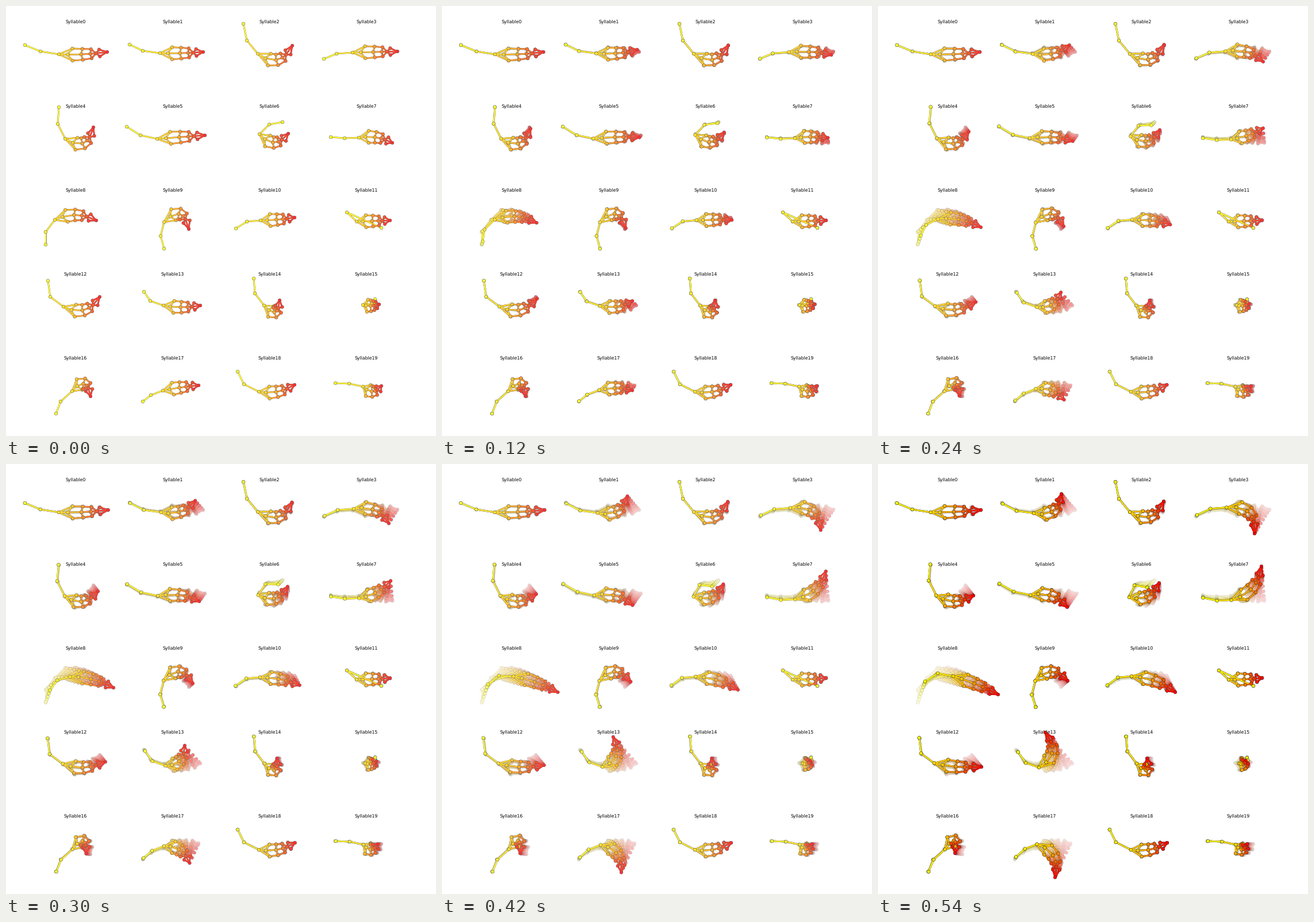
A matplotlib script for the animation above (0.6 s loop, 748 by 748 pixels).

```python
import numpy as np
import matplotlib.pyplot as plt
from matplotlib.animation import FuncAnimation
from matplotlib.collections import LineCollection

SIZE, DPI = 748, 100
STEPS, INTERVAL = 10, 60
RECOIL = -0.13  # how far the base swings against the nose

# The body hangs on a curve from tail base (0) to nose (1).
SPINE_AT = np.array([0, 0.18, 0.46, 0.65, 0.77, 1])
SIDE_AT = np.repeat([0.28, 0.49, 0.67, 0.84], 2)
HALF_WIDTH = np.repeat([10.5, 9.5, 8, 6], 2) * np.tile([1, -1], 4)

# Nodes: tip, tail, then the spine 2-7, then hips, waist, shoulders, ears.
EDGES = np.array([
    (0, 1), (1, 2), (2, 3), (2, 8), (2, 9), (3, 8), (3, 9), (3, 4),
    (8, 10), (9, 11), (4, 10), (4, 11), (4, 5), (10, 12), (11, 13),
    (5, 12), (5, 13), (5, 6), (12, 6), (13, 6), (6, 14), (6, 15),
    (14, 7), (15, 7), (6, 7)])
RANK = [0, 1, 2, 3, 8, 9, 4, 10, 11, 5, 12, 13, 6, 14, 15, 7]  # tail to nose
SHADE = 1 - np.argsort(RANK) / 15


def ease(u):
    return 0.8 * u * u * (3 - 2 * u) + 0.2 * u


def body(base, nose, bend):
    """Nodes along an arched line and in pairs on both sides of it."""
    chord = nose - base
    up = -1j * chord / abs(chord)

    def curve(t):
        return base + t * chord + 4 * t * (1 - t) * bend * up

    slope = chord + 4 * (1 - 2 * SIDE_AT) * bend * up
    sides = curve(SIDE_AT) - 1j * slope / abs(slope) * HALF_WIDTH
    return np.concatenate([curve(SPINE_AT), sides])


class Mouse:
    def __init__(self, tip, tail, base, nose, bend, nose_to, bend_to, walk=None):
        self.start = np.array([complex(*p) for p in (tip, tail, base, nose)])
        turn = complex(*nose_to) - self.start[3]
        if walk:
            shift = [complex(*p) for p in walk]
        else:
            shift = [0.6 * RECOIL * turn, RECOIL * turn, RECOIL * turn]
        self.shift = np.array([*shift, turn])
        self.bends = bend, bend_to

    def pose(self, e):
        tip, tail, base, nose = self.start + e * self.shift
        bend = self.bends[0] + e * (self.bends[1] - self.bends[0])
        z = np.concatenate([[tip, tail], body(base, nose, bend)])
        return np.column_stack([z.real, z.imag])


# Tail tip, tail middle, tail base, nose, arch; then where nose and arch end.
mice = [
    Mouse((33, 68), (60, 79), (92, 84), (176, 80), -2, (179, 80), -1),
    Mouse((215, 67), (238, 78), (268, 82), (343, 80), -1, (319, 52), -16),
    Mouse((413, 31), (419, 60), (438, 83), (498, 69), -18, (497, 65), -18),
    Mouse((553, 92), (575, 83), (603, 81), (681, 79), 0, (655, 121), 20),
    Mouse((92, 176), (90, 205), (103, 231), (152, 211), -19, (166, 229), -10),
    Mouse((210, 210), (234, 225), (263, 231), (346, 225), 0, (329, 249), 10),
    Mouse((481, 202), (458, 206), (441, 223), (491, 222), -15, (489, 207), -12,
          walk=[(-13, 13), (-12, 5), (-4, 9)]),
    Mouse((565, 228), (589, 230), (614, 229), (672, 238), 5, (667, 178), -13),
    Mouse((69, 415), (69, 393), (85, 372), (157, 373), 9, (209, 401), 2,
          walk=[(13, -37), (35, -29), (46, -3)]),
    Mouse((275, 422), (269, 400), (275, 376), (318, 388), 21, (330, 377), 16),
    Mouse((400, 387), (419, 375), (443, 373), (502, 368), -1, (517, 397), 6),
    Mouse((653, 386), (593, 359), (610, 375), (668, 373), 0, (668, 372), -1),
    Mouse((73, 478), (77, 506), (100, 523), (163, 506), -15, (180, 527), -3),
    Mouse((240, 497), (251, 513), (274, 521), (338, 521), -3, (291, 467), -18),
    Mouse((431, 474), (433, 500), (449, 521), (476, 512), -17, (468, 512), -18),
    Mouse((642, 510), (642, 517), (621, 520), (649, 519), -2, (640, 516), -3,
          walk=[(0, 1), (1, -2), (8, 1)]),
    Mouse((87, 709), (95, 688), (115, 670), (147, 679), 18, (134, 677), 20),
    Mouse((238, 688), (252, 677), (273, 669), (335, 660), 1, (308, 719), 15),
    Mouse((403, 636), (414, 658), (440, 671), (502, 659), -6, (503, 659), -6),
    Mouse((573, 656), (597, 657), (621, 662), (653, 661), -9, (642, 661), -9),
]

plt.rcParams["text.hinting"] = "none"
fig = plt.figure(figsize=(SIZE / DPI, SIZE / DPI), dpi=DPI, facecolor="white")
ax = fig.add_axes([0, 0, 1, 1])
ax.set(xlim=(0, SIZE), ylim=(SIZE, 0))
ax.axis("off")

cmap = plt.get_cmap("autumn")
node_colors = np.tile(cmap(SHADE), (len(mice), 1))
edge_colors = np.tile(cmap(SHADE[EDGES].mean(axis=1)), (len(mice), 1))


def add_edges(lines, colors, width, z):
    return ax.add_collection(LineCollection(
        lines, colors=colors, linewidths=width, capstyle="projecting", zorder=z))


# Each layer is one time step; a white veil fades it and all below it.
layers = []
for i in range(STEPS):
    poses = [m.pose(ease(i / (STEPS - 1))) for m in mice]
    lines = np.concatenate([p[EDGES] for p in poses])
    nodes = np.concatenate(poses)
    z = 4 * i
    layer = [
        add_edges(lines, "0.25", 2.0, z),
        add_edges(lines, edge_colors, 1.65, z + 1),
        ax.scatter(*nodes.T, s=16.5, c=node_colors, edgecolors="0.15",
                   linewidths=0.35, zorder=z + 2)]
    if i < STEPS - 1:
        layer.append(ax.add_patch(plt.Rectangle(
            (0, 0), SIZE, SIZE, fc="white", ec="none", alpha=0.2, zorder=z + 3)))
    layers.append(layer)

# Titles lie above every veil but under the last pose.
for n in range(len(mice)):
    row, col = divmod(n, 4)
    ax.text(121 + 168.7 * col, 29.6 + 146.25 * row, f"Syllable{n}",
            family="DejaVu Sans", fontsize=5.6, ha="center", va="baseline",
            zorder=4 * STEPS - 4.5)


def update(frame):
    for i, layer in enumerate(layers):
        for artist in layer:
            artist.set_visible(i <= frame)
    return []


anim = FuncAnimation(fig, update, frames=STEPS, init_func=lambda: update(0),
                     interval=INTERVAL, repeat=True, repeat_delay=0, blit=False)
plt.show()
```
